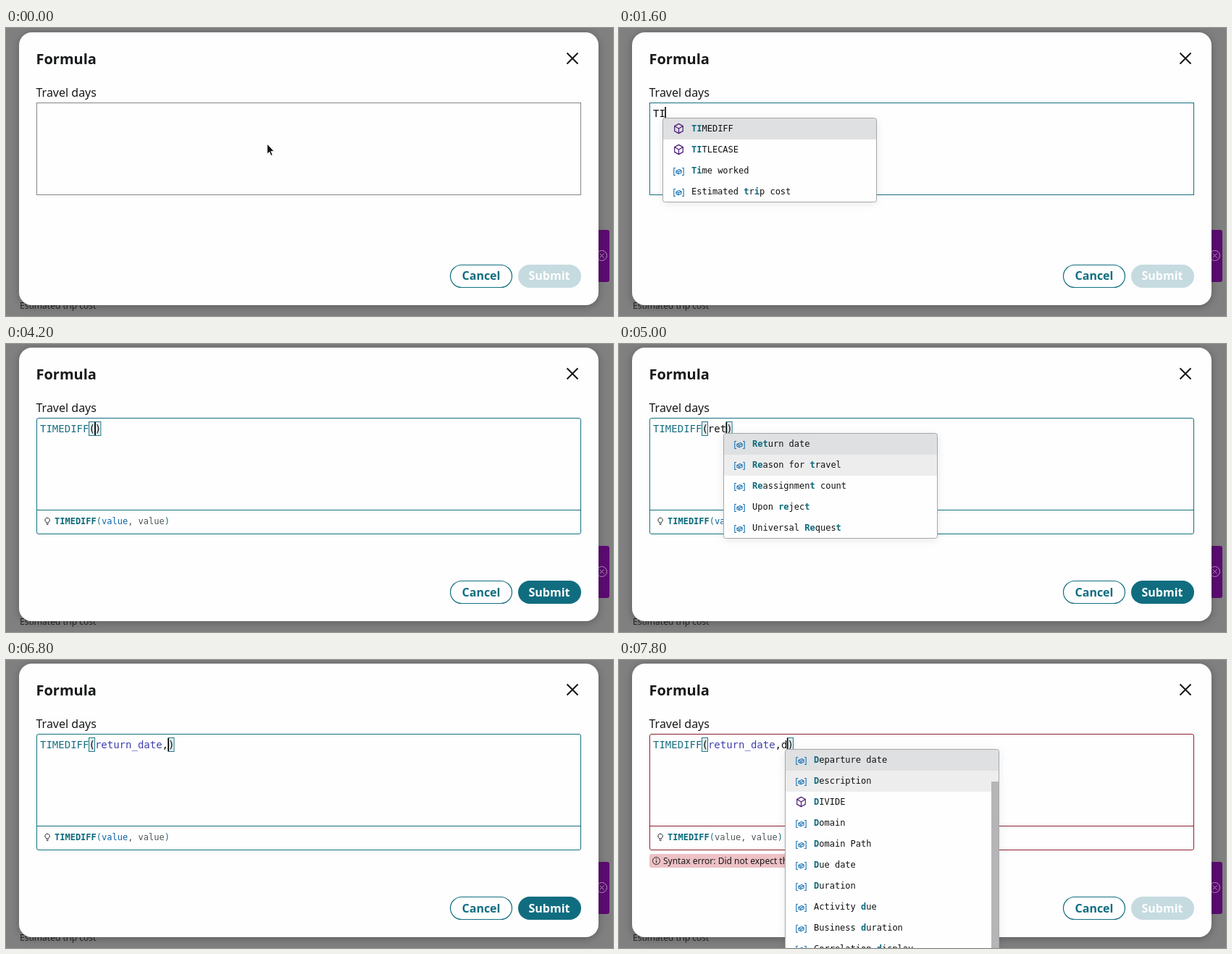
An HTML page for the animation above (8000 ms loop, 838 px wide and 398 px high).

```html
<!DOCTYPE html>
<html lang="en">
<head>
<meta charset="utf-8">
<title>Formula editor</title>
<style>
  html, body { margin: 0; width: 100%; height: 100%; overflow: hidden; background: #808080; }
  svg { display: block; }
  text { font-family: "Noto Sans", "Open Sans", sans-serif; fill: #17181a; white-space: pre; }
  .code { font: 14px "DejaVu Sans Mono", monospace; fill: #111; }
  .small { font: 12px "DejaVu Sans Mono", monospace; fill: #111; }
  .btn { font-size: 16px; font-weight: 600; text-anchor: middle; }
  .hit { font-weight: 700; fill: #0b6a7c; }
  .fn { fill: #1a6f80; }
  .field { fill: #403fae; }
  .now { fill: #0b66a8; }
  .dim { fill: #50565a; }
</style>
</head>
<body>
<svg width="838" height="398" viewBox="0 0 838 398">
  <defs>
    <filter id="shade" x="-10%" y="-10%" width="120%" height="125%">
      <feDropShadow dx="0" dy="2" stdDeviation="6" flood-color="#000" flood-opacity=".28"/>
    </filter>
    <g id="cube" fill="none" stroke="#4d1d78" stroke-width="1.2" stroke-linejoin="round">
      <path d="M0-6.6 5.8-3.4V3.4L0 6.6-5.8 3.4V-3.4ZM-5.8-3.4 0 0 5.8-3.4M0 0V6.6"/>
    </g>
    <g id="var" fill="none" stroke="#1a74b4" stroke-width="1.1" stroke-linejoin="round">
      <path d="M-4.5-5H-6.7V5H-4.5M4.5-5H6.7V5H4.5"/>
      <path d="M-3.6-1 .8-3 3.6-1.6V1.4L-.6 3.2-3.6 1.8ZM-3.6-1-.6.4 3.6-1.6M-.6.4V3.2"/>
    </g>
  </defs>

  <rect width="838" height="398" fill="#808080"/>
  <text x="19" y="388" font-size="12" style="fill:#242424">Estimated trip cost</text>
  <rect x="800" y="279" width="33" height="72" rx="3" fill="#5c0a72"/>
  <g fill="none" stroke="#b592bf">
    <circle cx="822.5" cy="314.5" r="7"/>
    <path d="M819.5 311.5l6 6M825.5 311.5l-6 6"/>
  </g>
  <rect id="card" x="18" width="800" rx="18" fill="#fefefe" filter="url(#shade)"/>

  <rect x="613.5" y="327.5" width="85" height="31" rx="15.5" fill="#fefefe" stroke="#126e80" stroke-width="1.2"/>
  <rect id="submit" x="707" y="327" width="87" height="32" rx="16"/>
  <g id="labels">
    <text class="btn" x="656" y="348" style="fill:#126e80">Cancel</text>
    <text class="btn" x="750" y="348" style="fill:#fff">Submit</text>
  </g>

  <g id="main">
    <text x="41.5" y="50" font-size="20" font-weight="700">Formula</text>
    <path d="M774.5 34.5l15 15M789.5 34.5l-15 15" stroke="#17181a" stroke-width="2"/>
    <text x="41.5" y="95" font-size="16">Travel days</text>
    <g id="editor"></g>
    <g id="error">
      <rect id="pink" x="42" y="269" height="19" rx="3" fill="#edc1c5"/>
      <circle cx="51.5" cy="278.5" r="5" fill="none" stroke="#222"/>
      <path d="M51.5 278v3.2M51.5 275.6v1.2" stroke="#222" stroke-width="1.2"/>
      <text id="message" x="61" y="283" font-size="12">Syntax error: Did not expect the token ")" here</text>
    </g>
    <g id="popup"></g>
  </g>
  <path id="mouse" d="M360.5 160v14.2l3.1-2.9 2.3 5.2 2.3-1-2.3-5.1h4.2Z" fill="#111" stroke="#fff" stroke-width=".9"/>
</svg>
<script>
const $ = id => document.getElementById(id);
const LOOP = 8000, CHAR = 8.43, LEFT = 47, BLINK = 600;
const POP_W = 295, ROW = 29, POP_Y = 124.5, MOUSE_X = 360;
const TEAL = "#137080", RED = "#8c1f2c";

// '#' marks a function, *...* marks matched letters
const lists = {
  t: ["#*T*IMEDIFF", "#*T*ITLECASE", "*T*ask type", "*T*ime worked", "*T*ransfer reason", "*T*ravel days",
      "Activity *t*ype", "Contact *t*ype", "Estimated *t*rip cost", "Reason for *t*ravel"],
  ti: ["#*TI*MEDIFF", "#*TI*TLECASE", "*Ti*me worked", "Estimated *t*r*i*p cost"],
  re: ["*Re*turn date", "*Re*ason for travel", "*Re*assignment count", "Upon *re*ject", "Universal *Re*quest",
       "Transfer *re*ason"],
  ret: ["*Ret*urn date", "*Re*ason for *t*ravel", "*Re*assignmen*t* count", "Upon *re*jec*t*", "Universal *Re*ques*t*"],
  d: ["*D*eparture date", "*D*escription", "#*D*IVIDE", "*D*omain", "*D*omain Path", "*D*ue date", "*D*uration",
      "Activity *d*ue", "Business *d*uration", "Correlation *d*isplay", "Delivery *d*ate"]
};

// Each step changes only what it names
const steps = [
  { at: 0, text: "", call: false, list: "", focus: false, hint: false, ok: false, error: false, mouse: true },
  { at: 200, focus: true },
  { at: 400, mouse: false },
  { at: 1000, text: "T", list: "t" },
  { at: 1600, text: "TI", list: "ti" },
  { at: 2200, text: "", call: true, list: "", ok: true },
  { at: 2800, hint: true },
  { at: 4400, text: "r" },
  { at: 4600, text: "re", list: "re" },
  { at: 4800, text: "ret", list: "ret" },
  { at: 5400, text: "return_date", list: "" },
  { at: 6600, text: "return_date," },
  { at: 7000, error: true, ok: false },
  { at: 7400, text: "return_date,d" },
  { at: 7600, list: "d" }
];
let last = {};
const states = steps.map(s => last = { ...last, ...s });

const span = (cls, s) => `<tspan class="${cls}">${s}</tspan>`;
const caretX = s => LEFT + CHAR * (s.text.length + (s.call ? 9 : 0));

function bracket(x) {
  return `<rect x="${x}" y="108.5" width="${CHAR - .4}" height="19" fill="#e1eceb" stroke="${TEAL}" stroke-width=".9"/>`;
}

function hint(s, color) {
  const first = span(s.text.endsWith("d") || s.error ? "dim" : "now", "value");
  return `<path d="M42.5 230.5H793.5" stroke="${color}"/>
    <path d="M55.8 248.5v-1.2a3.2 3.2 0 1 1 2.6 0v1.2ZM55.8 250.5h2.6" fill="none" stroke="#222"/>
    <text class="small" x="67" y="250">${span("hit", "TIMEDIFF")}${span("fn", "(")}${first}${span("dim", ", value")}${span("fn", ")")}</text>`;
}

function editor(s, caret) {
  const x = caretX(s);
  const color = s.error ? RED : s.focus ? TEAL : "#858585";
  let out = `<rect x="42.5" y="103.5" width="751" height="${s.hint ? 160 : 127}" rx="${s.hint ? 2.5 : 0}" fill="#fefefe" stroke="${color}"/>`;
  if (s.hint) out += hint(s, color);
  let body = s.text;
  if (s.call) {
    out += bracket(LEFT + 8 * CHAR) + bracket(x);
    body = span("fn", "TIMEDIFF") + "(" + body.replace("return_date", m => span("field", m)) + ")";
  }
  out += `<text class="code" x="${LEFT}" y="123">${body}</text>`;
  if (caret) out += `<rect x="${x - .6}" y="109" width="1.6" height="18" fill="#000"/>`;
  return out;
}

function popup(s) {
  if (!s.list) return "";
  const rows = lists[s.list], h = rows.length * ROW;
  const x = Math.floor(caretX(s) - 3.4) + .5;
  const band = (i, fill) => `<rect x="${x + .5}" y="${POP_Y + .5 + i * ROW}" width="${POP_W - 1}" height="${ROW}" fill="${fill}"/>`;
  let out = `<rect x="${x}" y="${POP_Y}" width="${POP_W}" height="${h}" rx="3" fill="#fefefe" filter="url(#shade)" opacity=".35"/>
    <rect x="${x}" y="${POP_Y}" width="${POP_W}" height="${h}" rx="3" fill="#fefefe"/>` + band(0, "#dfe0e2");
  if (x + POP_W > MOUSE_X) out += band(1, "#ededee");
  rows.forEach((row, i) => {
    const isFn = row[0] === "#", y = POP_Y + i * ROW;
    const label = row.replace("#", "").replace(/\*(.+?)\*/g, (m, c) => span("hit", c));
    out += `<use href="#${isFn ? "cube" : "var"}" x="${x + 22}" y="${y + (isFn ? 14.5 : 16)}"/>
      <text class="small" x="${x + 39.5}" y="${y + 18.5}">${label}</text>`;
  });
  if (h > 280) out += `<rect x="${x + POP_W - 10.5}" y="169" width="10.5" height="260" fill="#b5b5b7"/>`;
  return out + `<rect x="${x}" y="${POP_Y}" width="${POP_W}" height="${h}" rx="3" fill="none" stroke="#a6a7aa"/>`;
}

let shown = "";
function draw(t) {
  const s = states.findLast(v => v.at <= t);
  const caret = s.focus && (t - s.at) % (2 * BLINK) < BLINK;
  const key = s.at + "/" + caret;
  if (key === shown) return;
  shown = key;

  const up = s.hint ? 1 : 0;
  $("card").setAttribute("y", 6 - up);
  $("card").setAttribute("height", 377 + up);
  $("main").setAttribute("transform", `translate(0 ${-up})`);
  $("labels").setAttribute("transform", `translate(0 ${up})`);
  $("submit").setAttribute("fill", s.ok ? "#106d80" : "#c5dbe0");
  $("mouse").style.display = s.mouse ? "" : "none";
  $("error").style.display = s.error ? "" : "none";
  if (s.error) $("pink").setAttribute("width", $("message").getComputedTextLength() + 25);
  $("editor").innerHTML = editor(s, caret);
  $("popup").innerHTML = popup(s);
}

const start = performance.now();
function tick() {
  draw((performance.now() - start) % LOOP);
  requestAnimationFrame(tick);
}
tick();
</script>
</body>
</html>
```
